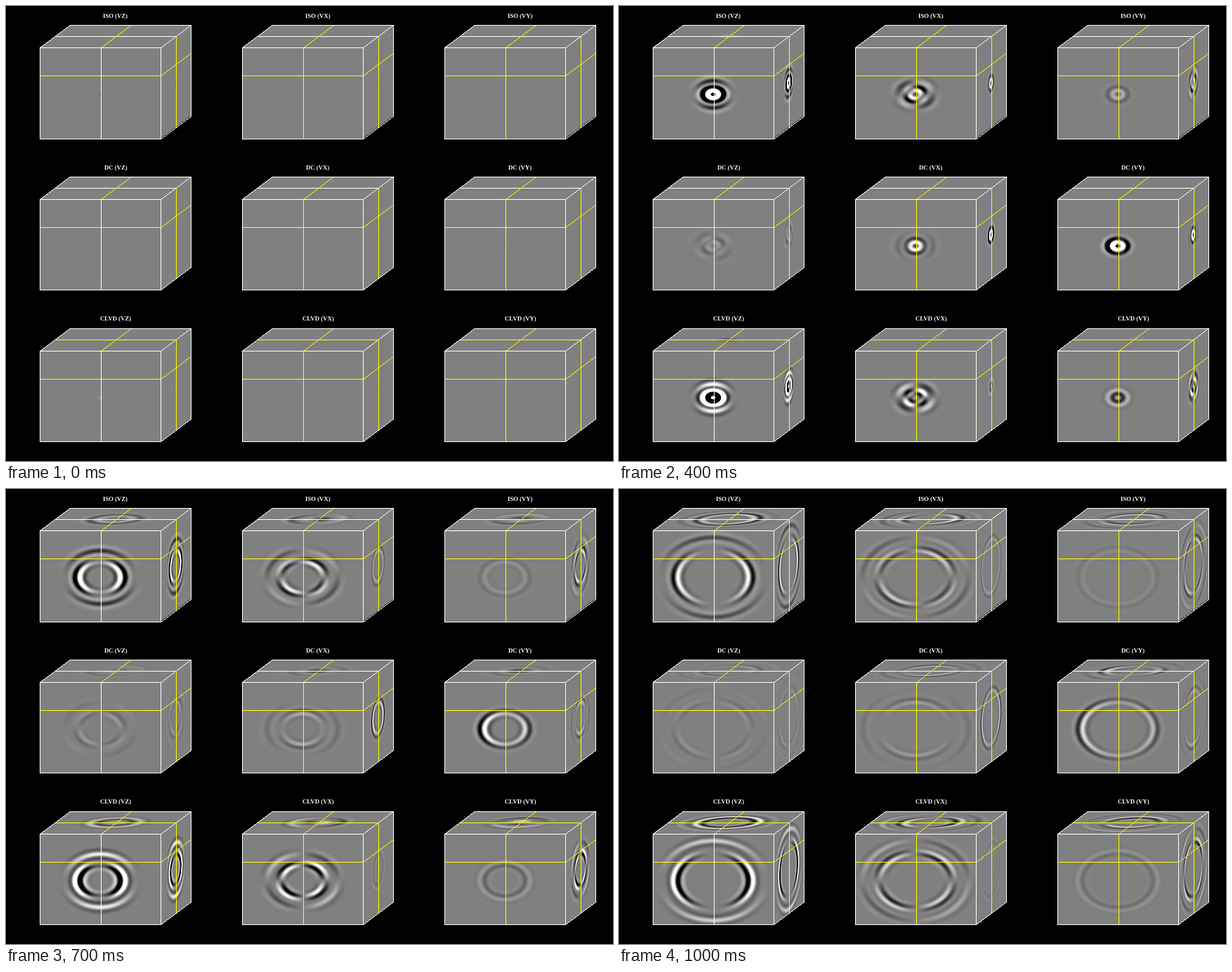
Animation of 864x648 px, one loop 1.1 s. Source, as a matplotlib script:

```python
import numpy as np
import matplotlib.pyplot as plt
from matplotlib.animation import FuncAnimation

W, H, DPI = 864, 648, 100
FRAMES, STEP = 11, 100
WHITE, YELLOW = (255, 255, 255), (255, 255, 0)

# Cube geometry in pixels: front face size and offset of the back face
FW, FH, DX, DY = 172, 129.5, 43, 32.1
CUT_Z, SRC_Z = 0.31, 0.515
LEFTS = [48, 336, 624]
TOPS = [27.2, 242.9, 458.6]

# Source direction (x, y, z) for each row
SOURCES = {
    "ISO": np.array([-0.12, -0.05, -0.72]),
    "DC": np.array([-0.36, -0.44, -0.05]),
    "CLVD": np.array([0.05, 0.09, 1.0]),
}
AXES = {"VZ": 2, "VX": 0, "VY": 1}


def cube_points():
    """Pixel positions of the visible faces and their place in the volume."""
    py, px = np.mgrid[0:163, 0:217]
    x, y = px + 0.5, py + 0.5

    v_top = (DY - y) / DY
    u_top = (x - DX * v_top) / FW
    top = (v_top >= 0) & (v_top <= 1) & (u_top >= 0) & (u_top <= 1)

    v_side = (x - FW) / DX
    w_side = (y - DY * (1 - v_side)) / FH
    side = (v_side > 0) & (v_side <= 1) & (w_side >= 0) & (w_side <= 1)

    w_front = (y - DY) / FH
    front = (x <= FW) & (w_front > 0) & (w_front <= 1)

    u = np.where(top, u_top, np.where(side, 0.5, x / FW))
    v = np.where(top, v_top, np.where(side, v_side, 0.5))
    w = np.where(top, CUT_Z, np.where(side, w_side, w_front))
    seen = top | side | front
    pos = np.stack([u - 0.5, v - 0.5, w - SRC_Z])[:, seen]
    return py[seen], px[seen], pos


ROWS, COLS, POS = cube_points()
R = np.sqrt((POS ** 2).sum(axis=0)) + 1e-6
N = POS / R
FAR = 1 - np.exp(-(R / 0.11) ** 2)


def p_wave(t):
    x = R - 0.0485 * (t - 0.95)
    ramp = np.clip((t - 1) / 4, 0, 1)
    pulse = np.cos(2 * np.pi * x / 0.115) * np.exp(-(x / 0.053) ** 2)
    return 0.28 * ramp * pulse / (R + 0.02)


def s_wave(t):
    x = R - (0.041 * t - 0.075) + 0.0235
    pulse = np.sin(2 * np.pi * x / 0.094) * np.exp(-(x / 0.05) ** 2)
    return 0.55 * pulse / (R + 0.02)


def directivity(kind, axis):
    if kind != "DC":
        return 1.0
    if axis == 0:
        return 0.4 + 0.7 * N[1] ** 2
    if axis == 1:
        return 0.4 + 0.55 * N[0] ** 2 - 0.25 * N[0]
    return 0.45


def wavefield(kind, axis, p, s):
    d = SOURCES[kind]
    along = N[axis] * (d @ N) * FAR
    return directivity(kind, axis) * (along * p + (d[axis] - along) * s)


def line(img, left, top, points, color):
    """One-pixel polyline through points given relative to a cube."""
    pts = [(round(left + x), round(top + y)) for x, y in points]
    for (x0, y0), (x1, y1) in zip(pts, pts[1:]):
        n = max(abs(x1 - x0), abs(y1 - y0)) + 1
        xs = np.rint(np.linspace(x0, x1, n)).astype(int)
        ys = np.rint(np.linspace(y0, y1, n)).astype(int)
        img[ys, xs] = color


def draw_cube(img, left, top, mid_color, back_color):
    cut, bottom = DY + CUT_Z * FH, DY + FH
    mid, mx, my = 87, DX / 2, DY / 2
    right = FW + DX
    line(img, left, top, [(mx, my), (FW + mx, my)], back_color)
    line(img, left, top, [(mid, DY), (mid, bottom)], mid_color)
    line(img, left, top, [(mid, DY), (mid + DX, 0)], YELLOW)
    line(img, left, top, [(0, cut), (FW, cut), (right, cut - DY)], YELLOW)
    line(img, left, top, [(FW + mx, my), (FW + mx, my + FH)], YELLOW)
    line(img, left, top, [(0, DY), (FW, DY), (FW, bottom), (0, bottom),
                          (0, DY), (DX, 0), (right, 0), (right, FH),
                          (FW, bottom)], WHITE)
    line(img, left, top, [(FW, DY), (right, 0)], WHITE)


def render(t):
    img = np.zeros((H, W, 3), np.uint8)
    p, s = p_wave(t), s_wave(t)
    for top, kind in zip(TOPS, SOURCES):
        for left, (name, axis) in zip(LEFTS, AXES.items()):
            u = np.clip(wavefield(kind, axis, p, s), -1, 1)
            grey = np.round(128 + 127 * u)
            img[ROWS + round(top), COLS + left] = grey[:, None]
            draw_cube(img, left, top,
                      WHITE if name == "VZ" else YELLOW,
                      YELLOW if kind == "CLVD" else WHITE)
    return img


fig = plt.figure(figsize=(W / DPI, H / DPI), dpi=DPI, facecolor="black")
ax = fig.add_axes([0, 0, 1, 1])
ax.set_xlim(0, W)
ax.set_ylim(H, 0)
ax.axis("off")
image = ax.imshow(render(0), extent=(0, W, H, 0),
                  interpolation="nearest", aspect="auto")

for top, kind in zip(TOPS, SOURCES):
    for left, name in zip(LEFTS, AXES):
        ax.text(left + 108, top - 13.2, f"{kind} ({name})", color="white",
                family="Liberation Serif", weight="bold",
                size=8.8 * 72 / DPI, ha="center", va="center")


def update(i):
    image.set_data(render(i))
    return [image]


anim = FuncAnimation(fig, update, frames=FRAMES, interval=STEP,
                     repeat=True, repeat_delay=0)
plt.show()
```
